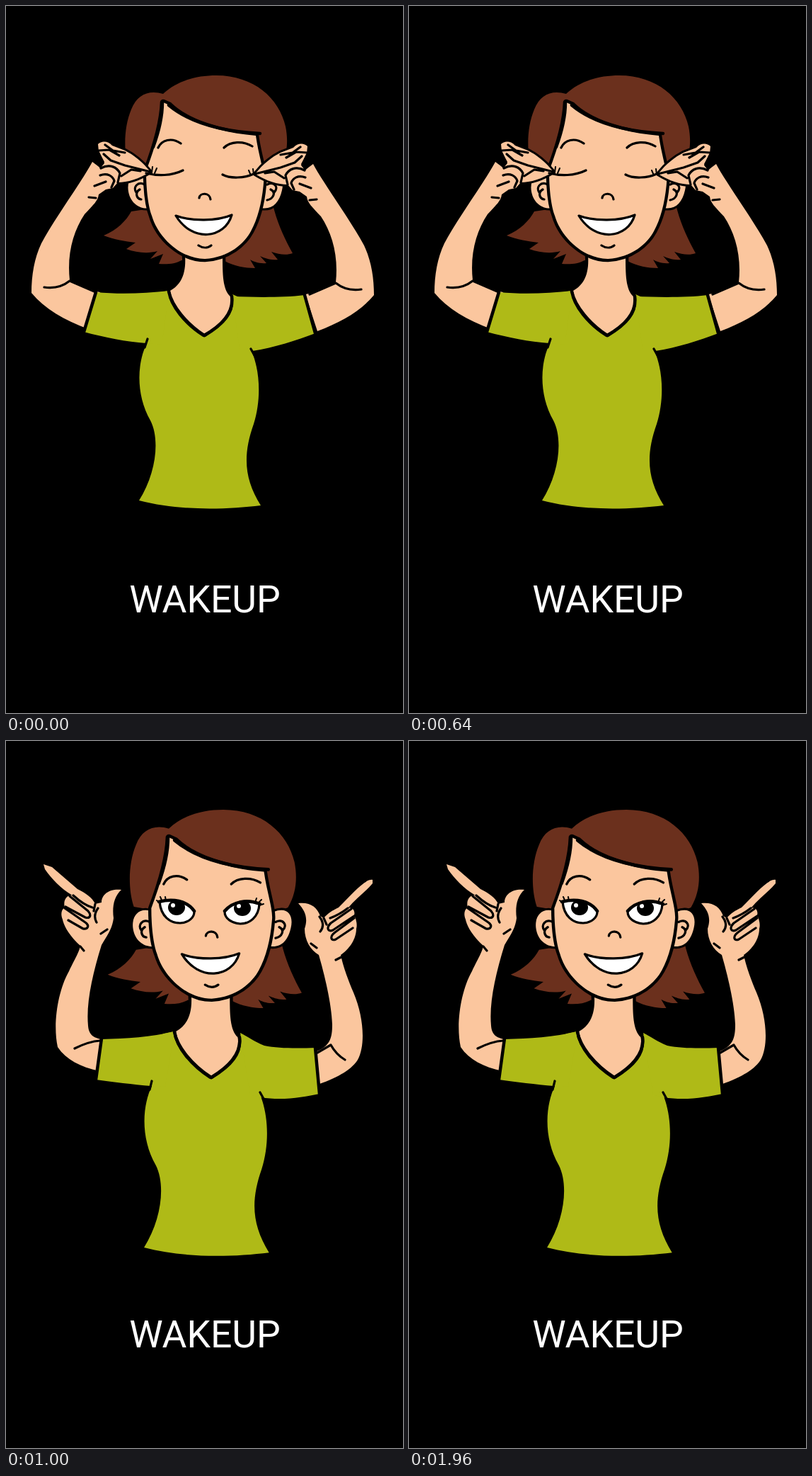
Animation, 561 px wide and 998 px high, one loop 2 s. Source, as an HTML page:

```html
<!DOCTYPE html>
<html lang="en">
<head>
<meta charset="utf-8">
<title>Wake up</title>
<style>
  html, body { margin: 0; width: 100%; height: 100%; overflow: hidden; background: #000; }
  svg { display: block; width: 100%; height: 100%; }
  .shape { stroke: #000; stroke-width: 6; stroke-linejoin: round; paint-order: stroke; }
  .bold { stroke-width: 8.5; }
  .skin { fill: #fbc69e; }
  .hair { fill: #6b301d; }
  .shirt { fill: #afba17; }
  .white { fill: #fff; }
  .line { fill: none; stroke: #000; stroke-width: 3.2; stroke-linecap: round; stroke-linejoin: round; }
  .thick { stroke-width: 4.5; }
  .lash { stroke-width: 2; }
  .filled { fill: #fff; }
  text { font: 400 53.5px Roboto, "Open Sans", sans-serif; fill: #fff; text-anchor: middle; }
</style>
</head>
<body>
<svg viewBox="0 0 561 998">
  <rect width="561" height="998"/>

  <!-- head and torso, common to both poses -->
  <g id="figure">
    <path class="hair" d="M222 124C242 105 270 98 297 98C350 98 386 130 395 170C399 190 398 212 386 232L367 240L379 288C385 310 395 331 405 349C397 352 386 351 375 347L384 358C373 359 366 356 359 353L368 363C358 364 350 361 345 358L352 370C338 370 322 367 309 360L248 359C239 364 228 365 216 364L222 350L204 357L214 346C200 350 184 348 170 343L183 334C168 332 153 330 138 324C157 316 170 303 177 290L197 287L197 235L174 231C166 208 166 172 177 146C185 125 202 118 222 124Z"/>
    <path class="shirt" d="M229 402L214 405L200 474C184 505 184 550 204 585C218 612 212 660 188 698C245 713 310 711 360 705C337 668 334 635 350 590C361 555 359 515 347 487L345 418L320 407L280 464Z"/>
    <path class="shape skin bold" d="M253 352C255 380 246 394 232 402C235 423 255 447 280 463C307 447 320 431 317 410C306 400 306 378 306 352Z"/>
    <path class="shape skin" d="M201 238C180 230 170 245 173 262C176 279 190 288 204 285Z"/>
    <path class="shape skin" d="M366 238C386 230 394 243 390 260C386 278 376 288 360 285Z"/>
    <path class="line" d="M196 252C186 247 179 256 184 263M189 259C182 263 184 272 191 273M369 252C379 247 386 256 379 263M374 259C382 263 378 272 369 274"/>
    <path class="shape skin bold" d="M222 136C221 163 212 196 198 233C198 260 201 283 206 296C215 327 247 357 281 357C315 355 337 335 346 318C356 300 362 275 364 250C366 235 357 212 353 183C305 179 257 165 231 140Z"/>
    <path class="line thick" d="M230 140C260 165 305 177 359 180M221 136C221 160 215 180 208 199"/>
    <path class="line" d="M215 200C220 189 234 185 247 194M308 200C317 191 335 190 348 198M273 271C274 263 288 263 289 273M272 338C278 342 285 342 290 338"/>
    <path class="line filled" d="M240 296C262 304 298 304 319 295C309 329 263 334 240 296Z"/>
  </g>

  <g id="pinching">
    <g id="bentArm">
      <path class="shape skin" d="M122 220C107 248 70 298 50 335C40 356 36 380 36 405C55 428 82 443 116 456L133 404C115 401 102 395 90 387C86 350 95 318 111 294C124 280 130 275 131 266L141 259L151 257L158 249C172 249 188 244 204 234C192 219 180 210 168 204L150 197C144 190 135 190 130 195L131 205L139 220L134 229Z"/>
      <path class="line" d="M127 404L90 388C80 396 68 399 54 397M131 204L146 203L160 211M140 196L151 204L168 207M138 209L148 218L168 225L204 234M134 229C147 222 157 228 161 236L158 249M133 239C143 235 151 240 153 247L149 256M125 254L141 248M117 270L127 271M163 240L177 231L190 233"/>
      <path d="M121 204L131 204L139 222L133 229L127 222Z"/>
      <path class="line lash" d="M206 235L207 227M210 236L213 229"/>
    </g>
    <use href="#bentArm" transform="matrix(-1 0 0 1 556 3)"/>
    <path class="shirt" d="M127 404C160 407 195 406 231 402L220 478L198 476C170 474 140 468 110 460ZM422 408C390 412 350 411 320 410L330 485L348 487C380 482 410 472 437 462Z"/>
    <path class="line thick" d="M127 404L110 460M422 408L437 462"/>
    <path class="line thick" d="M230 403C234 423 255 449 280 465C308 449 322 431 319 410"/>
    <path class="line" d="M200 470L196 482M346 484L351 493M198 236C214 240 234 240 250 232M306 238C317 244 337 243 350 237"/>
  </g>

  <g id="pointing" display="none">
    <path class="shape skin" d="M53 174L65 178L101 209C113 215 122 221 126 230L135 228C135 216 147 208 163 210C152 220 150 235 152 250C150 266 143 274 135 288C122 330 113 370 116 402C117 415 124 420 140 422L132 466C105 460 85 450 73 432C66 400 73 353 89 325C98 306 103 299 105 289C90 275 82 262 80 252C77 245 78 238 83 235C80 224 87 216 94 218C78 209 64 194 55 181Z"/>
    <path class="shape skin" d="M518 196C508 194 490 215 470 235C460 240 455 243 449 250L444 247C440 235 430 227 413 229C423 240 427 250 422 265C422 281 430 295 442 302C450 330 460 370 461 400C461 420 458 432 434 440L443 484C470 475 490 462 497 450C508 430 506 390 491 355C479 326 476 315 473 302C490 290 495 275 495 265C497 258 494 250 492 246C494 238 488 234 483 236C495 222 509 212 518 201Z"/>
    <path class="line" d="M95 218C106 228 115 233 122 235M90 219L116 240C121 246 119 251 112 249L84 234M83 236L112 256C119 261 115 266 109 265L88 253M126 230L124 240M130 236C125 243 124 249 128 256M105 290L110 296M143 266L134 272M133 423C118 424 105 430 97 434"/>
    <path class="line" d="M483 236C474 243 466 247 458 250M488 237L459 257C452 264 455 270 462 267L492 247M492 250L465 270C457 276 459 283 466 280L490 264M449 250L453 259M443 248C449 256 449 263 444 269M431 286L439 292M466 309L474 305M440 440L459 429C465 440 474 447 479 450"/>
    <path class="shirt" d="M135 421C170 420 205 418 238 410L225 488L205 487C180 485 150 481 127 478ZM438 433C410 434 385 434 365 430C352 425 341 417 331 412L345 500L360 503C390 508 420 503 443 498Z"/>
    <path class="line thick" d="M135 420L127 478M437 433L443 498"/>
    <path class="line thick" d="M238 411C242 432 263 458 290 475C318 458 333 440 330 418"/>
    <path class="line" d="M206 480L203 492M359 496L364 505"/>
    <g id="eyes">
      <path class="line filled" d="M217 227C219 248 232 257 246 257C259 256 266 249 266 241C256 225 235 222 217 227Z"/>
      <path class="line filled" d="M358 230C357 249 344 258 331 258C318 257 309 250 309 241C321 226 341 223 358 230Z"/>
      <ellipse cx="241" cy="235" rx="12" ry="11"/>
      <ellipse cx="334" cy="236" rx="12" ry="11"/>
      <circle class="white" cx="236" cy="232" r="3"/>
      <circle class="white" cx="329" cy="233" r="3"/>
      <path class="line thick" d="M216 227C235 222 256 225 266 240M309 240C321 226 341 223 359 230"/>
      <path class="line lash" d="M217 228L213 225M221 227L218 220M226 226L225 220M352 228L354 222M356 229L361 224M358 232L364 230"/>
    </g>
  </g>

  <text x="281" y="856">WAKEUP</text>
</svg>
<script>
  const LOOP = 2000, SWITCH = 1000;
  const byId = id => document.getElementById(id);
  const figure = byId("figure"), pinching = byId("pinching"), pointing = byId("pointing");
  const show = (node, on) => node.setAttribute("display", on ? "inline" : "none");
  const start = performance.now();

  function draw(time) {
    const awake = time % LOOP >= SWITCH;
    show(pinching, !awake);
    show(pointing, awake);
    // the awake figure stands slightly larger and to the right
    figure.setAttribute("transform", awake ? "matrix(1.027 0 0 1.03 2 -4)" : "");
  }

  function tick(now) {
    draw(Math.max(0, now - start));
    requestAnimationFrame(tick);
  }
  draw(0);
  requestAnimationFrame(tick);
</script>
</body>
</html>
```
